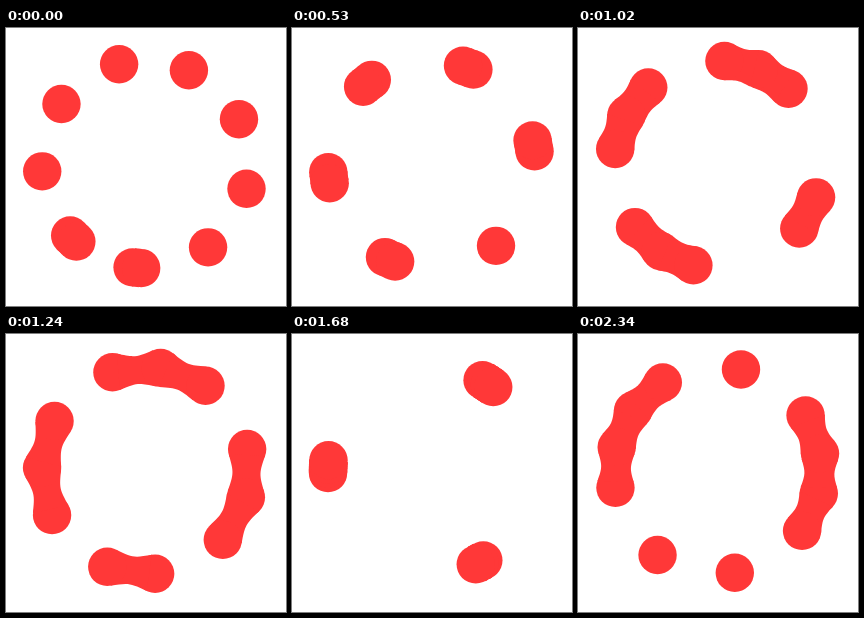
An HTML page with a canvas that plays this animation: 280 px wide and 278 px high, repeating every 2.44 s.

```html
<!DOCTYPE html>
<html lang="en">
<head>
<meta charset="utf-8">
<title>Gooey ring</title>
<style>
  html, body { margin: 0; width: 100%; height: 100%; overflow: hidden; background: #fff; }
  canvas { display: block; filter: blur(0.5px); }
</style>
</head>
<body>
<canvas id="stage" width="280" height="278"></canvas>
<script>
const LOOP = 2440;
const DOTS = 11;
const CENTER = { x: 139.7, y: 136.5 };
const ORBIT = 103.7;
const RADIUS = 19.2;
const BASE_ANGLE = 57.8;
const REACH = 60;       // largest distance at which two dots still stick together
const NECK_WIDTH = 0.8; // 0 = thin bridge, 1 = straight capsule

// Key points of the motion: [ms, degrees between successive dots]
const SPREAD = [[50, 39.47], [330, 50.4], [790, 70.03], [1020, 85.03], [1420, 106.23], [2340, 157.53]];

const ctx = document.getElementById('stage').getContext('2d');
const start = performance.now();

const polar = (origin, radius, angle) => ({
  x: origin.x + radius * Math.cos(angle),
  y: origin.y + radius * Math.sin(angle)
});

function spreadAt(t) {
  const next = SPREAD.findIndex(([time]) => time > t);
  if (next === 0) return SPREAD[0][1];
  if (next < 0) return SPREAD[SPREAD.length - 1][1];
  const [t0, a0] = SPREAD[next - 1];
  const [t1, a1] = SPREAD[next];
  return a0 + (a1 - a0) * (t - t0) / (t1 - t0);
}

function drawDot(dot) {
  ctx.beginPath();
  ctx.arc(dot.x, dot.y, RADIUS, 0, Math.PI * 2);
  ctx.fill();
}

// Fills the liquid bridge between two dots, with sides tangent to both circles
function drawNeck(a, b) {
  const distance = Math.hypot(b.x - a.x, b.y - a.y);
  if (distance < 0.1 || distance > REACH) return;
  const axis = Math.atan2(b.y - a.y, b.x - a.x);
  const overlap = Math.acos(Math.min(1, distance / (2 * RADIUS)));
  const open = overlap + (Math.PI / 2 - overlap) * NECK_WIDTH;
  const gap = distance - 2 * RADIUS * Math.cos(open);
  const handle = gap / 2 * Math.min(1, distance / RADIUS);

  const side = (from, to, sign) => {
    const p = polar(from.dot, RADIUS, from.facing + sign * open);
    const q = polar(to.dot, RADIUS, to.facing - sign * open);
    const h1 = polar(p, handle, from.facing + sign * (open - Math.PI / 2));
    const h2 = polar(q, handle, to.facing - sign * (open - Math.PI / 2));
    ctx.lineTo(p.x, p.y);
    ctx.bezierCurveTo(h1.x, h1.y, h2.x, h2.y, q.x, q.y);
  };

  const first = { dot: a, facing: axis };
  const second = { dot: b, facing: axis + Math.PI };
  ctx.beginPath();
  side(first, second, 1);
  side(second, first, 1);
  ctx.closePath();
  ctx.fill();
}

function draw() {
  const t = Math.max(0, performance.now() - start) % LOOP;
  const spread = spreadAt(t);
  const dots = Array.from({ length: DOTS }, (_, i) =>
    polar(CENTER, ORBIT, (BASE_ANGLE + (i + 1) * spread) * Math.PI / 180));

  ctx.clearRect(0, 0, 280, 278);
  ctx.fillStyle = '#ff3838';
  dots.forEach((dot, i) => {
    drawDot(dot);
    dots.slice(i + 1).forEach(other => drawNeck(dot, other));
  });
  requestAnimationFrame(draw);
}

draw();
</script>
</body>
</html>
```
